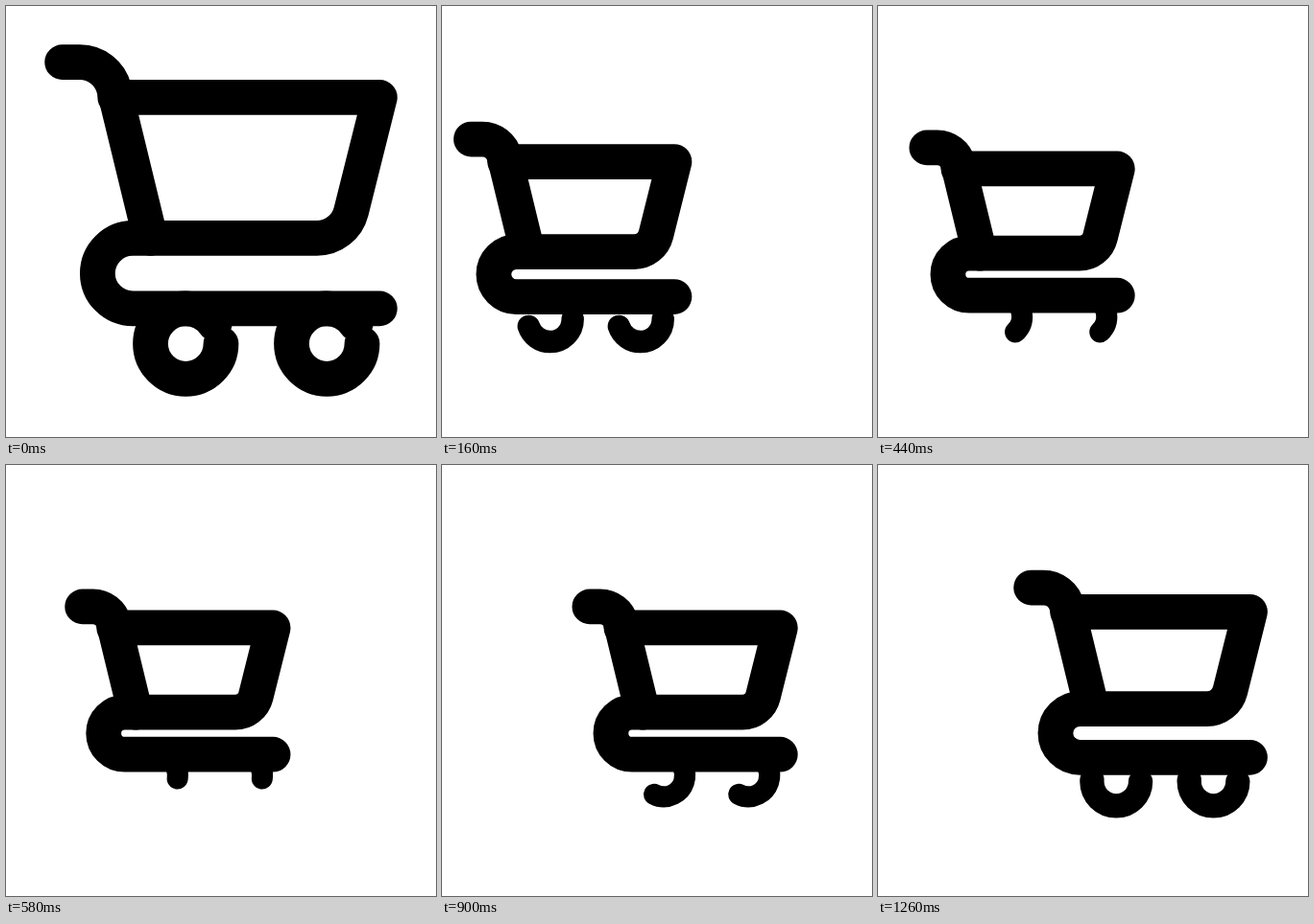
These frames come from a looping animation (448 px wide and 450 px high, 1.28 s). An HTML page without scripts:

```html
<!DOCTYPE html>
<html lang="en">
<head>
<meta charset="utf-8">
<title>Rolling shopping cart</title>
<style>
  @property --size { syntax: "<number>"; inherits: true; initial-value: 1; }
  @property --x { syntax: "<number>"; inherits: true; initial-value: 224; }
  @property --spin { syntax: "<angle>"; inherits: true; initial-value: 0deg; }

  html, body {
    margin: 0;
    width: 100%;
    height: 100%;
    overflow: hidden;
    background: #fff;
  }

  svg { display: block; }

  /* Drawn on a 24-unit grid; the body keeps its line weight while it shrinks. */
  .cart {
    --ease: cubic-bezier(.3333, 0, .6667, 1);
    animation: drive 1280ms var(--ease) infinite;
    transform:
      translate(calc(var(--x) * 1px), calc(281.75px - 57.75px * var(--size)))
      scale(calc(18.375 * var(--size)))
      translate(-12px, -12px);
    fill: none;
    stroke: #000;
    stroke-linecap: round;
    stroke-linejoin: round;
  }

  .body { stroke-width: calc(2px / var(--size)); }

  .wheel {
    stroke-width: 2px;
    stroke-dasharray: calc(140px * var(--size) - 40px) 200px;
    transform: rotate(var(--spin));
  }

  @keyframes drive {
    0% { --size: 1; --x: 224; --spin: 0deg; }
    15.625% { --size: .6; --x: 126.5; --spin: 0deg; }
    /* The return is cut off 40% of the way through. */
    93.75% {
      --size: .6; --x: 287.7; --spin: 1800deg;
      animation-timing-function: cubic-bezier(.3333, 0, .6667, .4545);
    }
    100% { --size: .7408; --x: 265.3; --spin: 1800deg; }
  }
</style>
</head>
<body>
<svg width="448" height="450" viewBox="0 0 448 450">
  <g class="cart">
    <g class="body">
      <path d="M3 3H4A2 2 0 0 1 5.94 4.515L8 13"/>
      <path d="M6 5H21L19.38 11.485A2 2 0 0 1 17.44 13H7A2 2 0 0 0 7 17H21"/>
    </g>
    <g transform="translate(10 19)"><circle class="wheel" r="2" pathLength="100"/></g>
    <g transform="translate(18 19)"><circle class="wheel" r="2" pathLength="100"/></g>
  </g>
</svg>
</body>
</html>
```
